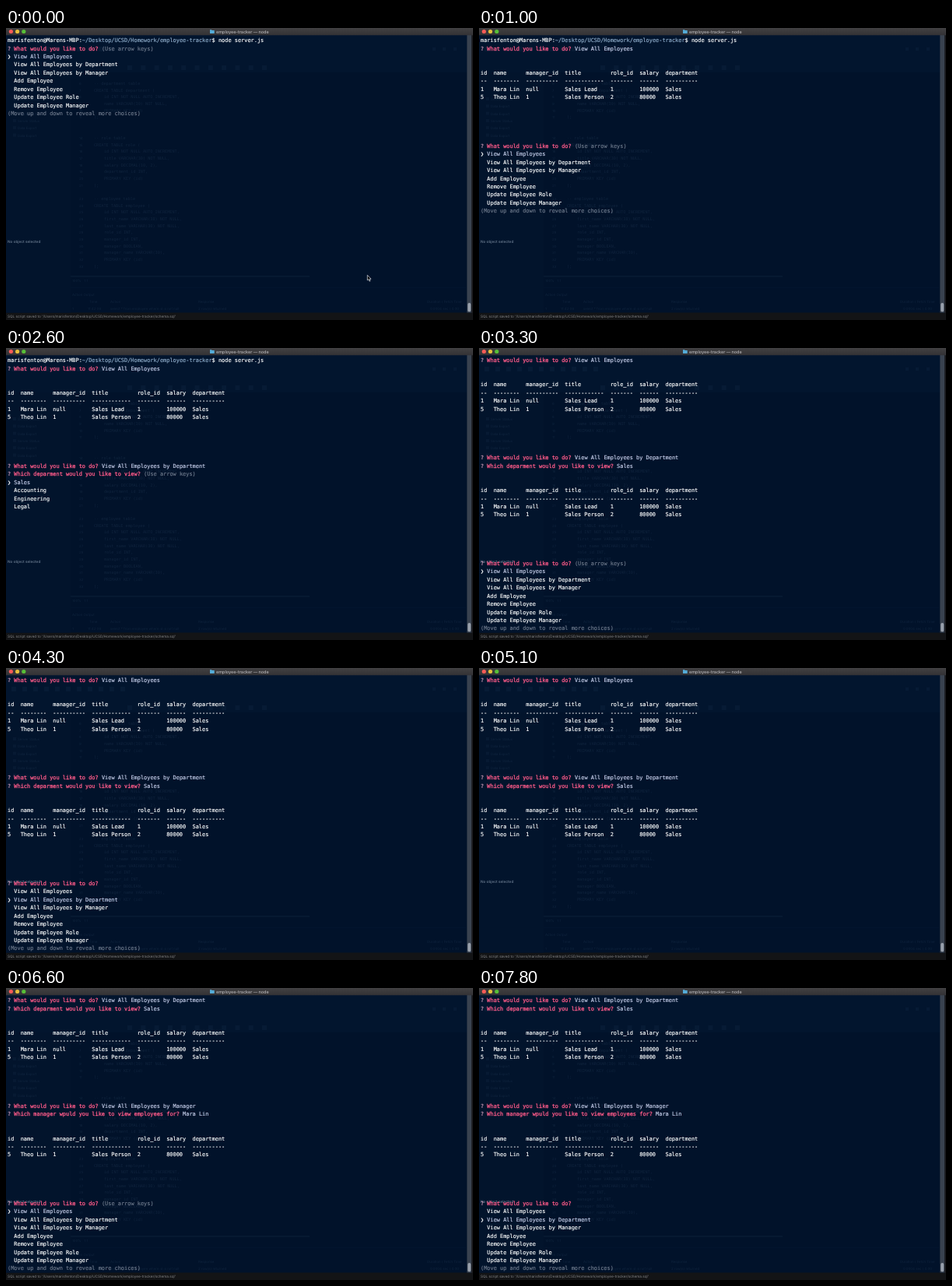
Animation of 600x375 px, one loop 8000 ms. Source, as an HTML page:

```html
<!DOCTYPE html>
<html>
<head>
<meta charset="utf-8">
<style>
  html, body { margin: 0; width: 100%; height: 100%; overflow: hidden; background: #111; }
  svg { display: block; width: 600px; height: 375px; text-rendering: geometricPrecision; }
  text { white-space: pre; }
  .ui { font-family: Inter, sans-serif; }
  #back { font: 4.4px Inter, sans-serif; fill: #7d9cc0; opacity: .13; }
  #back .code { font: 5.2px "DejaVu Sans Mono", monospace; }
  #back .soft { opacity: .4; }
  #term { font: 6.935px "DejaVu Sans Mono", monospace; color: #fff; stroke-width: .16; }
  #term text, #term tspan { fill: currentColor; stroke: currentColor; }
  .ask { color: #fb5a88; stroke-width: .3; }
  .mark { color: #dda6c4; }
  .pick { color: #c9d0ec; }
  .path { color: #8facc9; }
  .hint { color: #6f7a8c; }
</style>
</head>
<body>
<svg viewBox="0 0 600 375">
  <defs>
    <linearGradient id="bar" x2="0" y2="1">
      <stop stop-color="#414042"/><stop offset="1" stop-color="#333235"/>
    </linearGradient>
  </defs>
  <rect width="600" height="375" fill="#131416"/>
  <rect y="9" width="598" height="356.5" fill="#01122a"/>
  <rect y="9" width="83" height="356.5" fill="#02142c"/>
  <rect y="9" width="598" height="48" fill="#02152e"/>
  <g id="back"></g>
  <text class="ui" x="2" y="276.1" font-size="4.7" font-weight="600" fill="#64758a">No object selected</text>

  <rect x="592.3" y="9" width="5.9" height="356.5" fill="#39424f"/>
  <rect x="593.2" y="353" width="4" height="11.5" rx="2" fill="#98a0ab"/>
  <rect x="598.2" y="9" width="1.8" height="357" fill="#1b1c20"/>
  <rect width="600" height="9.3" fill="url(#bar)"/>
  <circle cx="6.4" cy="4.5" r="2.6" fill="#fc5b57"/>
  <circle cx="14.6" cy="4.5" r="2.6" fill="#e5bf3c"/>
  <circle cx="22.8" cy="4.5" r="2.6" fill="#57c038"/>
  <path d="M262 2.3h2l.7.8h3v4h-5.7z" fill="#55acd8"/>
  <text class="ui" x="270" y="6.6" font-size="5.45" font-weight="500" fill="#b6b5b8">employee-tracker — node</text>
  <text class="ui" x="2" y="371.8" font-size="4.65" fill="#85878a">SQL script saved to '/Users/marisfenton/Desktop/UCSD/Homework/employee-tracker/schema.sql'</text>

  <g id="term"></g>
  <path id="mouse" d="M0 0v6.6l1.5-1.3 1.1 2.5 1.2-.5-1.1-2.4h2z" fill="#000" stroke="#e8edf4" stroke-width=".7"/>
</svg>
<script>
const $ = id => document.getElementById(id);
const LOOP = 8000, ROWS = 34, TOP = 18.2, STEP = 10.43;

// Terminal content
const span = (kind, s) => `<tspan class="${kind}">${s}</tspan>`;
const ask = q => span('mark', '?') + ' ' + span('ask', q) + ' ';
const answer = (q, a) => ask(q) + span('pick', a);
const list = (q, items, at, fresh) => [
  ask(q) + (fresh ? span('hint', '(Use arrow keys)') : ''),
  ...items.map((s, i) => i === at ? '❯ ' + span('pick', s) : '  ' + s)
];

const widths = [2, 8, 10, 12, 7, 6, 10];
const row = cells => cells.map((c, i) => c.padEnd(widths[i])).join('  ');
const table = (...people) => [
  '', '',
  row(['id', 'name', 'manager_id', 'title', 'role_id', 'salary', 'department']),
  row(widths.map(w => '-'.repeat(w))),
  ...people.map(row),
  '', '', '', '', ''
];

const lead = ['1', 'Mara Lin', 'null', 'Sales Lead', '1', '100000', 'Sales'];
const seller = ['5', 'Theo Lin', '1', 'Sales Person', '2', '80000', 'Sales'];
const todo = 'What would you like to do?';
const whichDept = 'Which deparment would you like to view?';
const whichBoss = 'Which manager wpuld you like to view employees for?';
const actions = ['View All Employees', 'View All Employees by Department', 'View All Employees by Manager',
  'Add Employee', 'Remove Employee', 'Update Employee Role', 'Update Employee Manager'];
const menu = (at, fresh) => [...list(todo, actions, at, fresh),
  span('hint', '(Move up and down to reveal more choices)')];

const start = ['marisfenton@Marens-MBP:' + span('path', '~/Desktop/UCSD/Homework/employee-tracker') + '$ node server.js'];
const all = [...start, answer(todo, actions[0]), ...table(lead, seller)];
const pickDept = [...all, answer(todo, actions[1])];
const byDept = [...pickDept, answer(whichDept, 'Sales'), ...table(lead, seller)];
const pickBoss = [...byDept, answer(todo, actions[2])];
const byBoss = [...pickBoss, answer(whichBoss, lead[1]), ...table(seller)];

const screens = [
  [0, [...start, ...menu(0, true)]],
  [1000, [...all, ...menu(0, true)]],
  [2000, [...all, ...menu(1)]],
  [2600, [...pickDept, ...list(whichDept, ['Sales', 'Accounting', 'Engineering', 'Legal'], 0, true)]],
  [3300, [...byDept, ...menu(0, true)]],
  [4100, [...byDept, ...menu(1)]],
  [4500, [...byDept, ...menu(2)]],
  [5100, byDept],
  [5200, [...pickBoss, ...list(whichBoss, [lead[1], seller[1]], 0, true)]],
  [6600, [...byBoss, ...menu(0, true)]],
  [7600, [...byBoss, ...menu(1)]]
];

// The view only ever scrolls down
let scroll = 0;
const pages = screens.map(([, lines]) => {
  scroll = Math.max(scroll, lines.length - ROWS);
  return lines.slice(scroll)
    .map((s, i) => `<text x="2" y="${TOP + i * STEP}">${s}</text>`).join('');
});

// Faint window behind the terminal
const label = (x, y, s, kind = '') => `<text class="${kind}" x="${x}" y="${y}">${s}</text>`;
const box = (x, y, w, h) => `<rect class="soft" x="${x}" y="${y}" width="${w}" height="${h}"/>`;
const block = (y, first, lines) => lines.map((s, i) =>
  label(94, y + i * 8.65, first + i)
  + label(i < 2 || s === ');' ? 113 : 126, y + i * 8.65, s, 'code')).join('');
let back = block(73, 6, ['-- department table', 'CREATE TABLE department (', 'id INT NOT NULL AUTO_INCREMENT,', 'name VARCHAR(30) NOT NULL,', 'PRIMARY KEY (id)', ');'])
  + block(143, 14, ['-- role table', 'CREATE TABLE role (', 'id INT NOT NULL AUTO_INCREMENT,', 'title VARCHAR(30) NOT NULL,', 'salary DECIMAL(10, 2),', 'department_id INT,', 'PRIMARY KEY (id)', ');'])
  + block(221, 23, ['-- employee table', 'CREATE TABLE employee (', 'id INT NOT NULL AUTO_INCREMENT,', 'first_name VARCHAR(30) NOT NULL,', 'last_name VARCHAR(30) NOT NULL,', 'role_id INT,', 'manager_id INT,', 'manager BOOLEAN,', 'manager_name VARCHAR(30),', 'PRIMARY KEY (id)', ');']);
for (let i = 0; i < 6; i++) back += box(9, 89 + i * 9.3, 4, 4) + label(15, 93 + i * 9.3, i % 3 ? 'Data Export' : 'Server Status');
for (let i = 0; i < 11; i++) back += box(7 + i * 14, 24, 6, 6) + box(156 + i * 17.3, 48, 6, 6);
for (const x of [548, 561, 575]) back += box(x, 25, 4, 4);
back += box(83, 318, 307, 2) + box(83, 333, 508, .5)
  + label(85, 326, '100%   1:1') + label(85, 344, 'Action Output')
  + [[107, 'Time'], [134, 'Action'], [247, 'Response'], [541, 'Duration / Fetch Time']].map(([x, s]) => label(x, 353, s)).join('')
  + label(85, 362, '1') + label(105, 362, '11:42:06') + label(134, 362, 'select * from employee where id is not null')
  + label(247, 362, '2 row(s) returned') + label(545, 362, '0.0004 sec / 0.00');
$('back').innerHTML = back;

let shown = -1;
const began = performance.now();
function draw(now) {
  const t = Math.max(0, now - began) % LOOP;
  const page = screens.findLastIndex(([at]) => t >= at);
  if (page !== shown) $('term').innerHTML = pages[shown = page];
  const [x, y] = t < 200 ? [464.3, 317.4] : t < 300 ? [476, 316.5] : [487.5, 315.4];
  $('mouse').setAttribute('transform', `translate(${x} ${y})`);
  $('mouse').style.display = t < 800 ? '' : 'none';
  requestAnimationFrame(draw);
}
draw(began);
</script>
</body>
</html>
```
